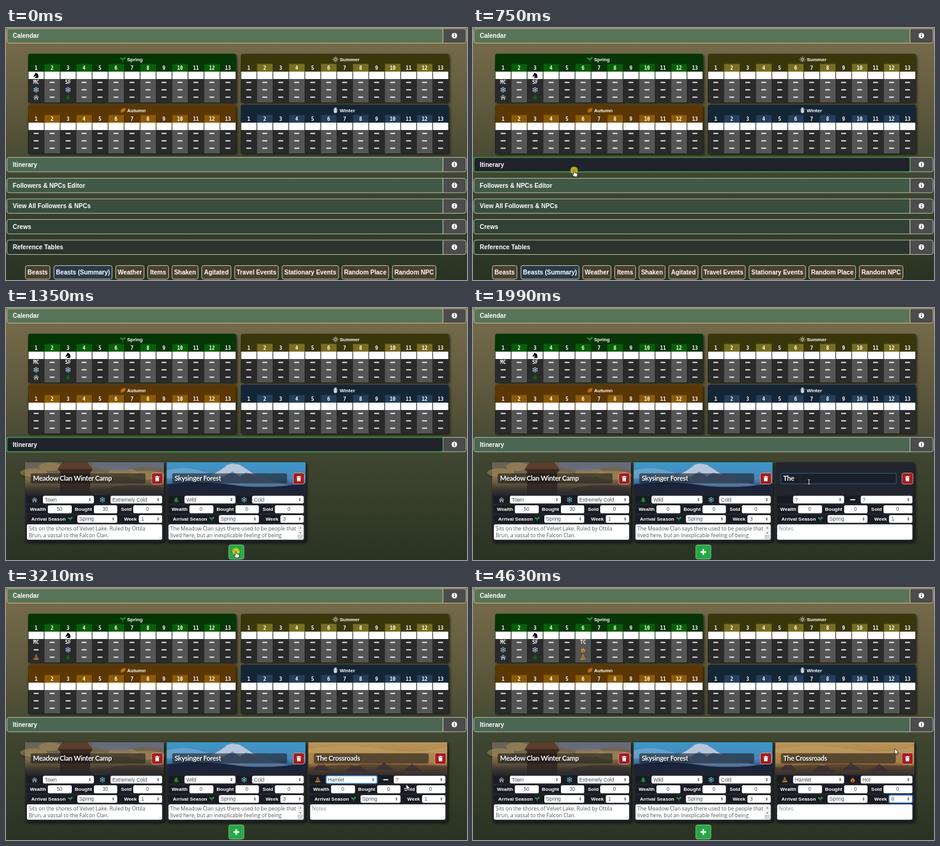
These frames come from a looping animation (750x410 px, 6.17 s). An HTML page:

```html
<!DOCTYPE html>
<html lang="en">
<head>
<meta charset="utf-8">
<title>Campaign calendar</title>
<style>
  html, body { margin: 0; width: 100%; height: 100%; overflow: hidden; background: #39402d; }
  svg { display: block; }
  text { font-family: "Liberation Sans", Arial, sans-serif; white-space: pre; }
  .mono { font-family: "DejaVu Sans Mono", monospace; }
  .title { font-family: Lato, sans-serif; letter-spacing: -.3px; filter: drop-shadow(1px 1px 1px #000a); }
  .notes { font-family: "Open Sans", sans-serif; }
  .shadow { filter: drop-shadow(2px 2px 2px #000b); }
</style>
</head>
<body>
<svg id="stage" width="750" height="410" viewBox="0 0 750 410"></svg>
<script>
const LOOP = 6170;
const RIDE = 260, HOVER = 540, OPEN = 755, ADD = 1400, FOCUS = 1700;
const KIND_OPEN = 2680, KIND = 2920, CLIMATE_OPEN = 3340, CLIMATE = 3580;
const WEEK_FOCUS = 3900, WEEK_OPEN = 4120, WEEK = 4520;
const PLACE = 'The Crossroads';

const rect = (x, y, w, h, fill, more = '') =>
  `<rect x="${x}" y="${y}" width="${w}" height="${h}" fill="${fill}" ${more}/>`;
const path = (d, fill, more = '') => `<path d="${d}" fill="${fill}" ${more}/>`;
const group = (inner, more = '') => `<g ${more}>${inner}</g>`;
// y is the vertical middle of the capitals
const text = (x, y, s, size, { fill = '#fff', bold = 1, anchor = 'start', cls = '', id = '' } = {}) =>
  `<text id="${id}" class="${cls}" x="${x}" y="${(y + size * .36).toFixed(2)}" font-size="${size}" ` +
  `font-weight="${bold ? 700 : 400}" text-anchor="${anchor}" fill="${fill}">${s.replace(/&/g, '&amp;')}</text>`;
const during = (from, to, inner) => group(inner, `data-from="${from}" data-to="${to}"`);

const ICONS = {
  home: 'M-5 0L0-4.5L5 0L4.2.9L0-3L-4.2.9ZM-3.4 1L0-2L3.4 1V4.6H1V1.8H-1V4.6H-3.4Z',
  tree: 'M0-5L3-1.5H1.8L4 1.2H2.4L4.5 3.5H.8V5H-.8V3.5H-4.5L-2.4 1.2H-4L-1.8-1.5H-3Z',
  fire: 'M-.8-5C0-3 4-1 3.8 1.8C3.6 4 1.8 5 0 5C-2 5-3.8 3.8-3.8 1.6C-3.8-.2-2.6-1-2.2-2.4C-1.4-1.8-1-1.2-1-.4C-.2-1.6-.2-3.4-.8-5ZM0 .8C1.6 2.2 1.5 4 0 4C-1.5 4-1.6 2.2 0 .8Z',
  tent: 'M-1.2-4.6L-.5-5L0-4.2L.5-5L1.2-4.6L.6-3.4L4.2 3.4H5V4.5H-5V3.4H-4.2L-.6-3.4ZM0-2L-2.9 3.4H-1.7L0 .2L1.7 3.4H2.9Z',
  sprout: 'M-.5 5V1.2C-3 1-5-1-5-3.2C-2-3.4 0-2 .2 0C.6-2.5 2.5-4.5 5-4.5C5-1.5 3.2.8.6 1V5Z',
  leaf: 'M-4 2.6C-4.6-2 0-3.6 5-4.4C5.2 1.6 1 5-2.9 3.4L-4.6 5L-5 4.4L-1 .6Z',
  snowman: 'M-1.8-5H1.8V-3.6H2.6V-2.8H1.8C2.2-1.8 2-1 1.6-.6L4-2.2L4.6-1.6L2.4.4C4 2.4 2.8 5 0 5C-2.8 5-4 2.4-2.4.4L-4.6-1.6L-4-2.2L-1.6-.6C-2-1-2.2-1.8-1.8-2.8H-2.6V-3.6H-1.8Z',
  horse: 'M-4.6 1.4L-1.6-3.2L-1.8-5L.5-4C3.5-3.5 4.8 0 4 4.6H-2.2C-2.2 2.8.4 2 .2.6C-1 1.6-2.5 1.4-3.4 2.8Z',
  trash: 'M-4-4H-1.5L-1-5H1L1.5-4H4V-2.9H-4ZM-3.4-2.2H3.4L3 5H-3Z',
  caret: 'M-2-.6L0-3L2-.6ZM-2 .6L0 3L2 .6Z',
};
const LINES = {
  snow: 'M0-5V5M-4.3-2.5L4.3 2.5M-4.3 2.5L4.3-2.5M-1.5-4.4L0-3L1.5-4.4M-1.5 4.4L0 3L1.5 4.4M-4.5-.9L-2.6-1.5L-3-3.5M4.5.9L2.6 1.5L3 3.5M-4.5.9L-2.6 1.5L-3 3.5M4.5-.9L2.6-1.5L3-3.5',
  sun: 'M-2 0A2 2 0 1 0 2 0A2 2 0 1 0-2 0M0-5V-3.2M0 5V3.2M-5 0H-3.2M5 0H3.2M-3.5-3.5L-2.3-2.3M3.5 3.5L2.3 2.3M-3.5 3.5L-2.3 2.3M3.5-3.5L2.3-2.3',
};
const icon = (name, x, y, fill, scale = .9) => {
  const at = `transform="translate(${x} ${y}) scale(${scale})"`;
  return LINES[name]
    ? path(LINES[name], 'none', `${at} stroke="${fill}" stroke-width="1"`)
    : path(ICONS[name], fill, `${at} fill-rule="evenodd"`);
};
const SNOW = '#a9d8ee', HOME = '#a9b3bb', TREE = '#0b6315', FIRE = '#e0703a', TENT = '#cf8b35';
const dash = (x, y) => rect(x - 4, y - .8, 8, 1.7, '#fff');

// Accordion rows
function header(y, label, fill, stroke = '#b4bfae') {
  return path(`M711 ${y + .5}H5Q1.5 ${y + .5} 1.5 ${y + 4}V${y + 20.5}Q1.5 ${y + 24} 5 ${y + 24}H711Z`, fill, `stroke="${stroke}"`) +
    path(`M711 ${y + .5}H745Q748.5 ${y + .5} 748.5 ${y + 4}V${y + 20.5}Q748.5 ${y + 24} 745 ${y + 24}H711Z`, '#4b4c4b', `stroke="${stroke}"`) +
    `<circle cx="729.5" cy="${y + 12}" r="4.5" fill="#fff"/>` +
    rect(728.8, y + 9, 1.5, 1.5, '#444') + rect(728.8, y + 11.3, 1.5, 3.4, '#444') +
    text(11, y + 12.2, label, 10);
}

// Calendar
function season(x, y, name, mark, markFill, dark, bright, cell) {
  let out = rect(x, y, 338, 79, dark, 'rx="3"');
  const mid = x + 169;
  out += icon(mark, mid - 15, y + 9, markFill) + text(mid - 8, y + 9, name, 8);
  for (let c = 0; c < 13; c++) {
    const left = x + c * 26, cx = left + 13, odd = c % 2;
    out += rect(left, y + 16.5, 26, 12.5, odd ? bright : dark) +
      rect(left + .5, y + 29, 25, 12, '#fff') +
      rect(left, y + 41, 26, 38, odd ? '#555' : '#2a2a2a') +
      rect(left, y + 16.5, .6, 62.5, '#0007') +
      text(cx, y + 23, String(c + 1), 8, { anchor: 'middle', cls: 'mono' });
    for (let r = 0; r < 3; r++) out += cell(c + 1, r, cx, y + 46.5 + r * 12);
  }
  return group(out, 'class="shadow"');
}
const plain = (c, r, x, y) => dash(x, y);
function springCell(c, r, x, y) {
  const code = s => text(x, y, s, 8, { anchor: 'middle', cls: 'mono' });
  const steps = list => list.map(([from, to, art]) => during(from, to, art)).join('');
  if (c === 1) return [
    () => code('MC'),
    () => steps([[0, ADD, icon('snow', x, y, SNOW)], [ADD, CLIMATE, dash(x, y)],
      [CLIMATE, WEEK, icon('fire', x, y, FIRE)], [WEEK, LOOP, icon('snow', x, y, '#8fc0ee')]]),
    () => steps([[0, ADD, icon('home', x, y, HOME)], [ADD, KIND, dash(x, y)],
      [KIND, WEEK, icon('tent', x, y, TENT)], [WEEK, LOOP, icon('home', x, y, '#9db4e4')]]),
  ][r]();
  if (c === 3) return [code('SF'), icon('snow', x, y, SNOW), icon('tree', x, y, TREE)][r];
  if (c === 6) return steps([[0, WEEK, dash(x, y)],
    [WEEK, LOOP, [code('TC'), icon('fire', x, y, TENT), icon('tent', x, y, TENT)][r]]]);
  return dash(x, y);
}
const calendar =
  season(36, 42, 'Spring', 'sprout', '#2c8a2c', '#063506', '#075f07', springCell) +
  season(382, 42, 'Summer', 'sun', '#fff', '#3a360c', '#786e20', plain) +
  season(36, 125, 'Autumn', 'leaf', '#b87018', '#5a3704', '#8c5b06', plain) +
  season(382, 125, 'Winter', 'snowman', '#cfd6da', '#142636', '#233f5a', plain) +
  during(0, RIDE, icon('horse', 49, 77, '#111')) +
  during(RIDE, LOOP, icon('horse', 101, 77, '#111'));

// Itinerary cards, in coordinates of the first card
const GREY = '#495057';
const label = (x, y, s) => text(x, y, s, 8);
const value = (x, y, s, anchor = 'start') => text(x, y, s, 8.3, { fill: GREY, bold: 0, anchor });
const field = (x, y, w, h = 12.5) => rect(x, y, w, h, '#fff', 'rx="2.5"');
const select = (x, y, w, inner) => field(x, y, w) + inner + icon('caret', x + w - 6.5, y + 6.2, '#343a40', .85);
const ring = (x, y, w) => rect(x, y, w, 12.5, 'none', 'rx="2.5" stroke="#3d8de0" stroke-width="1.6"');

const lake =
  rect(31, 251, 226, 53, 'url(#dusk)') +
  [[45, 268, 22], [72, 258, 18], [150, 275, 26], [190, 268, 24], [228, 272, 30]]
    .map(([x, y, r]) => `<ellipse cx="${x}" cy="${y}" rx="${r}" ry="7" fill="#a88f55" opacity=".55"/>`).join('') +
  path('M140 251H257V263Q230 254 205 262T140 258Z', '#66708a', 'opacity=".7"') +
  path('M88 304V266L84 262L92 251H132L141 263L137 268V304Z', '#3b2a20') +
  path('M92 251H132L140 262H85Z', '#5b3f2c') +
  path('M137 304Q180 280 257 292V304Z', '#473a30');
const peak =
  rect(31, 251, 226, 53, 'url(#sky)') +
  path('M60 291Q110 274 128 256L136 253L152 255Q180 277 240 291Z', '#5f83b0') +
  path('M103 272Q120 264 130 255L138 253L150 255L176 272L160 268L150 274L138 266L124 274Z', '#b4c6dc') +
  path('M31 264Q60 256 90 266T130 277H31Z', '#8db7d4', 'opacity=".45"') +
  path('M31 287Q90 280 140 288T257 285V304H31Z', '#18233f');
const camp =
  rect(31, 251, 226, 53, 'url(#sand)') +
  path('M31 262Q90 252 150 262T257 258V268H31Z', '#c8a468', 'opacity=".5"') +
  path('M31 292Q110 282 257 290V304H31Z', '#6b4d2f') +
  path('M38 297L52 282L66 297ZM90 299L108 284L128 299ZM140 296L154 284L170 296ZM185 298L200 286L216 298Z', '#4c3838') +
  path('M47 288L52 282L57 288ZM102 289L108 284L114 289Z', '#a56a3c');

function card(i, art, title, d) {
  const note = (y, s, fill = '#55595e') => text(37, y, s, 8.5, { fill, bold: 0, cls: 'notes' });
  return group(
    rect(31, 251, 226, 129, '#22252d', 'rx="3"') + art +
    rect(31, 284, 226, 20, 'url(#fade)') +
    rect(40, 269, 187, 16.5, '#15161a', 'rx="3" opacity=".55"') + title +
    rect(237, 268.5, 18, 18, '#a51c1f', 'rx="3" stroke="#d9b3b3" stroke-width=".8"') + icon('trash', 246, 277.5, '#fff') +
    rect(34, 305.5, 220, 12.5, '#191b22', 'rx="2.5"') +
    d.kindIcon + select(60, 305.5, 83, d.kind) + d.climateIcon + select(170, 305.5, 84, d.climate) +
    rect(34, 321, 220, 13, '#191b22', 'rx="2.5"') +
    label(39, 327.5, 'Wealth') + field(68, 321, 39, 13) + value(87, 327.5, d.wealth, 'middle') +
    label(112, 327.5, 'Bought') + field(143, 321, 38, 13) + value(161.5, 327.5, d.bought, 'middle') +
    label(187, 327.5, 'Sold') + field(207, 321, 47, 13) + value(230, 327.5, '0', 'middle') +
    rect(34, 337, 220, 12.5, '#191b22', 'rx="2.5"') +
    label(41, 343.3, 'Arrival Season') + icon('sprout', 104.5, 343, '#2fa34a', .8) +
    select(116, 337, 65, value(119, 343.3, 'Spring')) +
    label(192, 343.3, 'Week') + select(216, 337, 38, d.week) +
    rect(34, 352, 220, 25, '#fff', 'rx="2.5"') +
    d.notes.map((s, n) => note(358.7 + n * 11.6, s, d.noteFill)).join('') + (d.extra || ''),
    `class="shadow" transform="translate(${i * 230.4} 0)"`);
}
const heading = (s, id = '') => text(44, 277.5, s, 11, { cls: 'title', id });
const cards =
  card(0, lake, heading('Meadow Clan Winter Camp'), {
    kindIcon: icon('home', 46.5, 312, '#8fa0b4'), kind: value(63, 311.8, 'Town'),
    climateIcon: icon('snow', 157, 312, '#6cc7e6'), climate: value(173, 311.8, 'Extremely Cold'),
    wealth: '50', bought: '30', week: value(220, 343.3, '1'),
    notes: ['Sits on the shores of Velvet Lake. Ruled by Ottila', 'Brun, a vassal to the Falcon Clan.'],
    extra: path('M249 375.5L252.5 372M251 375.5L252.5 374', 'none', 'stroke="#888" stroke-width=".6"'),
  }) +
  card(1, peak, heading('Skysinger Forest'), {
    kindIcon: icon('tree', 46.5, 312, '#1d8a30'), kind: value(63, 311.8, 'Wild'),
    climateIcon: icon('snow', 157, 312, '#6cc7e6'), climate: value(173, 311.8, 'Cold'),
    wealth: '0', bought: '0', week: value(220, 343.3, '3'),
    notes: ['The Meadow Clan says there used to be people that', 'lived here, but an inexplicable feeling of being'],
    extra: rect(244, 353, 9, 23, '#f0f0f0') + path('M247 358.5L248.5 356.5L250 358.5ZM247 365L248.5 367L250 365Z', '#555') + rect(244, 369, 9, 7, '#d5d5d5'),
  }) +
  during(ADD, LOOP, card(2,
    during(KIND, LOOP, camp),
    during(FOCUS, 2600, rect(40, 269, 188, 17, '#1a1f29', 'rx="3" stroke="#234d78" stroke-width="1.4"')) + heading('', 'place'), {
      kindIcon: during(KIND, LOOP, icon('tent', 46.5, 312, TENT)),
      kind: during(ADD, KIND, value(63, 311.8, '?')) + during(KIND, LOOP, value(63, 311.8, 'Hamlet')),
      climateIcon: during(ADD, CLIMATE, dash(157, 311.8)) + during(CLIMATE, LOOP, icon('fire', 157, 312, FIRE)),
      climate: during(ADD, CLIMATE, value(173, 311.8, '?')) + during(CLIMATE, LOOP, value(173, 311.8, 'Hot')),
      wealth: '0', bought: '0',
      week: during(ADD, WEEK, value(220, 343.3, '1')) + during(WEEK, LOOP, value(220, 343.3, '6')),
      notes: ['Notes'], noteFill: '#82888e',
      extra: during(KIND_OPEN, CLIMATE_OPEN, ring(60, 305.5, 83)) +
        during(CLIMATE_OPEN, WEEK_FOCUS, ring(170, 305.5, 84)) +
        during(WEEK_FOCUS, LOOP, ring(216, 337, 38)),
    }));
const addButton = rect(362.5, 385.5, 24.5, 23, '#28a745', 'rx="3" stroke="#8fd3a0" stroke-width=".8"') +
  rect(370, 395.8, 9.5, 2.4, '#fff') + rect(373.5, 392.2, 2.4, 9.5, '#fff');

// Rows that slide down when the itinerary opens
const tabs = [['Beasts', 31, 72], ['Beasts (Summary)', 77.5, 173], ['Weather', 178, 225], ['Items', 230, 265],
  ['Shaken', 269.5, 313], ['Agitated', 318, 366.5], ['Travel Events', 371.5, 443.5],
  ['Stationary Events', 448.5, 541.5], ['Random Place', 546, 623], ['Random NPC', 628, 700]];
const lower =
  header(244, 'Followers & NPCs Editor', '#425947') + header(277.5, 'View All Followers & NPCs', '#3a4e3e') +
  header(311, 'Crews', '#314135') + header(344.5, 'Reference Tables', '#29342d') +
  tabs.map(([s, a, b], i) =>
    rect(a + .5, 386.5, b - a - 1, 22, i === 1 ? '#293b4b' : '#4a402e', 'rx="3" stroke="#c9c4b4"') +
    text((a + b) / 2, 397.5, s, 10, { anchor: 'middle' })).join('');

// Open option lists
const lists = [
  { x: 521, y: 319, w: 83, row: 12, from: KIND_OPEN, to: KIND, items: ['?', 'Town', 'Hamlet', 'Wild'] },
  { x: 631, y: 319, w: 84, row: 12, from: CLIMATE_OPEN, to: CLIMATE, items: ['?', 'Extremely Cold', 'Cold', 'Hot', 'Extremely Hot'] },
  { x: 677, y: 205, w: 39, row: 10.1, from: WEEK_OPEN, to: WEEK, items: Array.from({ length: 13 }, (_, i) => String(i + 1)) },
];
const menus = lists.map((m, i) => during(m.from, m.to,
  rect(m.x, m.y, m.w, m.row * m.items.length, '#fff', 'stroke="#777" stroke-width=".8"') +
  rect(m.x, m.y, m.w, m.row, '#9cc4f0', `id="pick${i}"`) +
  m.items.map((s, n) => value(m.x + 4, m.y + (n + .5) * m.row, s)).join(''))).join('');

const pointers = {
  arrow: path('M0 0V9.5L2.2 7.5L3.8 11L5.3 10.3L3.8 7H6.8Z', '#fff', 'stroke="#111" stroke-width=".8"'),
  hand: path('M-.9.8Q0-.6 1 .8V4L5 5Q6 5.4 5.6 7.2L4.8 10.5H-.4L-3 6.8Q-2.6 5.4-.9 6.8Z', '#fff', 'stroke="#111" stroke-width=".8"'),
  beam: path('M-1.8-3.5H1.8M0-3.5V3.5M-1.8 3.5H1.8', 'none', 'stroke="#ddd" stroke-width=".9"'),
};
const stops = list => list.map(([o, c]) => `<stop offset="${o}" stop-color="${c}"/>`).join('');
const shade = (id, list) => `<linearGradient id="${id}" x1="0" y1="0" x2="0" y2="1">${stops(list)}</linearGradient>`;

const stage = document.getElementById('stage');
stage.innerHTML = '<defs>' +
  shade('page', [[0, '#7a6f4e'], [.3, '#605a3e'], [.6, '#3f4530'], [1, '#293323']]) +
  shade('dusk', [[0, '#66615c'], [.5, '#7c6a48'], [1, '#3c3028']]) +
  shade('sky', [[0, '#3c98c8'], [.5, '#4a86b8'], [1, '#1b2948']]) +
  shade('sand', [[0, '#b8935a'], [.6, '#a88046'], [1, '#6a4c30']]) +
  '<linearGradient id="fade" x1="0" y1="0" x2="0" y2="1"><stop stop-color="#22252d" stop-opacity="0"/><stop offset="1" stop-color="#22252d" stop-opacity=".75"/></linearGradient>' +
  '<clipPath id="reveal"><rect id="window" y="235" width="750"/></clipPath></defs>' +
  rect(0, 0, 750, 410, 'url(#page)') +
  header(0.5, 'Calendar', '#587459', '#c9b48a') + calendar +
  header(210, 'Itinerary', '#4b6651') +
  during(HOVER, ADD, rect(1.5, 210.5, 709.5, 23.5, '#20232b', 'rx="3" stroke="#3f9a4e" stroke-width="1.5"') + text(11, 222.2, 'Itinerary', 10)) +
  group(cards + addButton, 'clip-path="url(#reveal)"') +
  group(lower, 'id="lower"') + menus +
  '<circle id="click" fill="#d2c21c"/>' +
  group(Object.entries(pointers).map(([k, art]) => group(art, `data-pointer="${k}"`)).join(''), 'id="cursor"');

const $ = id => document.getElementById(id);
const timed = [...stage.querySelectorAll('[data-from]')];
const shapes = [...stage.querySelectorAll('[data-pointer]')];
const clamp = (v, a, b) => Math.min(b, Math.max(a, v));
const smooth = p => p * p * (3 - 2 * p);

const route = [[0, 106, 76, ''], [80, 106, 76, 'hand'], [260, 106, 76, 'hand'], [620, 164, 231, 'hand'], [900, 165, 232, 'hand'],
  [1260, 374, 396, 'hand'], [1400, 374, 396, 'arrow'], [1660, 546.5, 283, 'beam'], [2360, 546.5, 283, 'beam'],
  [2540, 556, 305, 'arrow'], [2700, 556, 311, 'arrow'], [2880, 545, 349, 'arrow'], [2940, 545, 349, 'arrow'],
  [3170, 651, 319, 'arrow'], [3210, 651, 319, 'arrow'], [3320, 660, 313, 'arrow'], [3540, 650, 361, 'arrow'],
  [3820, 688, 342, 'arrow'], [4160, 688, 342, 'arrow'], [4440, 686, 261, 'arrow'], [LOOP, 686, 261, 'arrow']];
const clicks = [230, 725, 1330];

function cursorAt(t) {
  const n = clamp(route.findIndex(k => k[0] > t), 1, route.length - 1);
  const [a, b] = [route[n - 1], route[n]];
  const p = smooth((t - a[0]) / (b[0] - a[0]));
  return { x: a[1] + (b[1] - a[1]) * p, y: a[2] + (b[2] - a[2]) * p, kind: a[3] };
}

function render(t) {
  for (const el of timed)
    el.style.display = t >= +el.dataset.from && t < +el.dataset.to ? '' : 'none';

  const drop = 184 * (1 - (1 - clamp((t - OPEN) / 300, 0, 1)) ** 2.45);
  $('lower').setAttribute('transform', `translate(0 ${drop})`);
  $('window').setAttribute('height', drop ? 4 + drop : 0);

  const typed = t < 1990 ? Math.min(4, Math.floor((t - 1720) / 50)) : 4 + Math.floor((t - 1990) / 45);
  $('place').textContent = PLACE.slice(0, clamp(typed, 0, PLACE.length));

  const c = cursorAt(t);
  $('cursor').setAttribute('transform', `translate(${c.x} ${c.y})`);
  for (const s of shapes) s.style.display = s.dataset.pointer === c.kind ? '' : 'none';

  const hit = clicks.find(k => t >= k - 30 && t < k + 200);
  const fade = hit === undefined ? 0 : 1 - clamp((t - hit - 50) / 150, 0, 1);
  $('click').setAttribute('r', fade ? 4 + 2 * fade : 0);
  $('click').setAttribute('cx', c.x);
  $('click').setAttribute('cy', c.y);
  $('click').setAttribute('opacity', .85 * fade);

  lists.forEach((m, i) => {
    const n = clamp(Math.floor((c.y - m.y) / m.row), 0, m.items.length - 1);
    $('pick' + i).setAttribute('y', m.y + n * m.row);
  });
}

const start = performance.now();
function tick() {
  render((performance.now() - start) % LOOP);
  requestAnimationFrame(tick);
}
tick();
</script>
</body>
</html>
```
